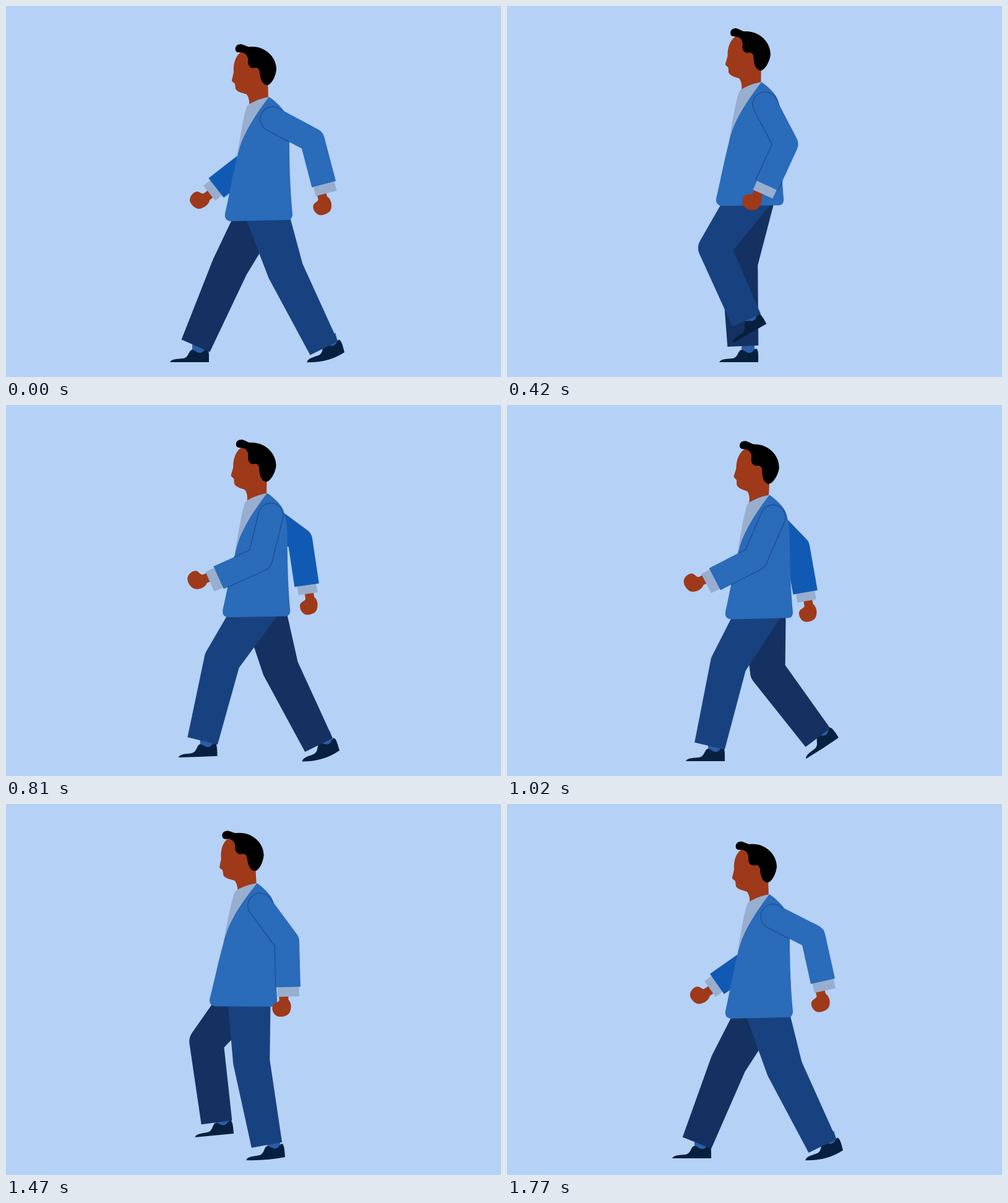
These frames come from a looping animation (800 by 600 pixels, 1.8 s). An HTML page with a canvas:

```html
<!DOCTYPE html>
<html lang="en">
<head>
<meta charset="utf-8">
<title>Walk cycle</title>
<style>
html, body { margin: 0; width: 100%; height: 100%; overflow: hidden; background: #b5d1f6; }
canvas { display: block; }
</style>
</head>
<body>
<canvas id="stage" width="800" height="600"></canvas>
<script>
const ctx = document.getElementById('stage').getContext('2d');
const LOOP = 1800, STEP = 30, RAD = Math.PI / 180;
const SKIN = '#9e391a', CLOTH = '#98aece', JACKET = '#2a6bba';

// time, x, y, lean, head tilt
const bodyKeys = [
  [0, 0, 0, 0, 0],
  [240, -7, -8, 0, 2.7],
  [460, -18, -25.5, 0.9, 2],
  [560, -22.5, -23.5, 1.5, 0.8],
  [630, -22, -19.5, 1.6, 0],
  [720, -12, -13, 0.8, 1.5],
  [890, 0, 0, 0, 3.5],
  [1020, -1, -1.5, 0, 4.5],
  [1200, -11, -11, 0, 5],
  [1370, -20, -23, 0.9, 0],
  [1470, -25, -19.5, 1.7, -3.2],
  [1620, -12, -12.5, 0.8, -1.5],
  [1770, -1, -1, 0, 0]
];
// time, knee x y, trouser end x y, heel x y, foot angle
const nearLegKeys = [
  [0, 452, 428, 514, 553.5, 547, 560, -15],
  [120, 419, 428, 494, 540, 528, 541, -30],
  [240, 381.5, 418, 456.5, 527, 491, 526, -39.4],
  [430, 335, 392, 384, 508, 416, 514, -29],
  [630, 326, 387, 330, 518, 360, 533, -14.5],
  [890, 357, 421, 316, 550, 339, 575.5, 0],
  [1020, 358, 419.5, 327.5, 551.5, 352, 576, 0],
  [1200, 362, 420, 355, 551, 381, 576, 0],
  [1470, 397, 417, 421.5, 551.5, 451, 571, -4.5],
  [1770, 449, 428, 510, 553, 543, 560, -15]
];
const farLegKeys = [
  [0, 362, 422, 306.5, 549.5, 328, 576, 0],
  [240, 356.5, 413, 336, 548, 360, 576, 0],
  [430, 377, 417, 384, 550, 409, 576, 0],
  [630, 399, 417.5, 439.5, 546.5, 472, 561, -14],
  [900, 456, 430, 521, 551, 554, 557, -18],
  [1020, 422, 431, 502.5, 538, 536, 538, -33],
  [1200, 359, 409, 433, 515, 466, 517, -33.4],
  [1330, 333, 392, 383, 506, 415, 513, -22],
  [1470, 324, 386, 340.5, 515, 368, 533, -5.5],
  [1770, 358, 420, 307, 548, 330, 573, 0]
];
// time, upper arm angle, forearm angle
const nearArmKeys = [
  [0, 62, 14.7], [240, 37, 7.5], [630, 16, -62], [880, -21, -66],
  [1020, -23.5, -62.7], [1200, 3.2, -38], [1470, 36.5, 1.5], [1770, 63, 12.5]
];
const farArmKeys = [
  [0, -18, -52], [240, -3, -32], [630, 49, -2.5], [880, 54, 10],
  [1020, 44, 10], [1200, 36, -1.6], [1470, 14, -38], [1770, -15.5, -55]
];

const jacket = new Path2D('M425 147C433 152 444 162 449 170C455 180 458 200 458 222C458 265 460 305 463 336C463 343 460 346 455 346L364 348C356 348 353 343 354 336C360 310 366 275 374 243C379 222 383 214 387 206C396 187 412 164 425 147Z');
const shirt = new Path2D('M425 147C412 149 398 155 390 161C384 175 378 215 373 246L385 246L400 190Z');
const face = new Path2D('M379 75C370 82 367 95 368 107L365 120C365 123 369 124 370 126L371 134C374 140 385 141 389 143C392 147 394 153 393 163L424 152L423 120L420 80Z');
const hair = new Path2D('M371 72C369 64 376 61 381 62C388 64 390 66 394 66C420 64 437 84 437 102C436 115 428 128 422 128C414 127 411 118 410 108C410 102 406 99 402 100C396 102 391 97 391 90C392 83 389 78 384 76C379 74 373 77 371 72Z');
// elbow at the origin, forearm pointing down
const hand = new Path2D('M0 84L0 94C3 97 4 101 4 106C3 113 1 117 -3 119C-9 122 -17 122 -21 119C-26 115 -28 107 -25 102C-22 98 -17 99 -15 95L-15 84Z');

// Monotone cubic interpolation over cyclic keys
function sample(keys, t) {
  const n = keys.length;
  const key = j => keys[(j + n) % n];
  const time = j => key(j)[0] + Math.floor(j / n) * LOOP;
  const i = keys.findLastIndex(k => k[0] <= t);
  const h = time(i + 1) - time(i), u = (t - time(i)) / h;
  return keys[0].slice(1).map((_, c) => {
    const val = j => key(j)[c + 1];
    const slope = j => (val(j + 1) - val(j)) / (time(j + 1) - time(j));
    const tangent = j => {
      const a = slope(j - 1), b = slope(j);
      return a * b > 0 ? 2 * a * b / (a + b) : 0;
    };
    const v = 1 - u;
    return v * v * (1 + 2 * u) * val(i) + u * u * (3 - 2 * u) * val(i + 1)
      + h * u * v * (v * tangent(i) - u * tangent(i + 1));
  });
}

// Limb angles run from straight down, positive towards the back
const along = (p, a, d) => [p[0] + d * Math.sin(a), p[1] + d * Math.cos(a)];
const front = (p, a, d) => [p[0] - d * Math.cos(a), p[1] + d * Math.sin(a)];
const angle = (p, q) => Math.atan2(q[0] - p[0], q[1] - p[1]);

function fill(color, path) {
  ctx.fillStyle = color;
  path ? ctx.fill(path) : ctx.fill();
}

function within(x, y, turn, draw) {
  ctx.save();
  ctx.translate(x, y);
  ctx.rotate(turn);
  draw();
  ctx.restore();
}

function shoe(x, y, a) {
  const toeY = y - 63 * Math.sin(a);
  const ground = Math.max(0, Math.min(1, (toeY - 572) / 3));
  const sag = 5 * ground * Math.min(1, -a / (12 * RAD));
  within(x, y, a, () => {
    ctx.fillStyle = '#2a5ca8';
    ctx.fillRect(-27, -34, 21, 24);
    ctx.beginPath();
    ctx.moveTo(0, 0);
    ctx.lineTo(0, -10);
    ctx.bezierCurveTo(0, -16, -1, -22, -4, -22);
    ctx.bezierCurveTo(-8, -20, -9, -15, -15, -15);
    ctx.bezierCurveTo(-20, -15, -22, -20, -28, -20);
    ctx.bezierCurveTo(-33, -18, -33, -7, -42, -6);
    ctx.bezierCurveTo(-50, -5, -60, -6, -63, 0);
    ctx.quadraticCurveTo(-30, 2 * sag, 0, 0);
    fill('#08203f');
  });
}

function leg(hip, keys, t, color) {
  const [kx, ky, cx, cy, hx, hy, a] = sample(keys, t);
  const knee = [kx, ky], cuff = [cx, cy];
  const thigh = angle(hip, knee), shin = angle(knee, cuff), mid = (thigh + shin) / 2;
  shoe(hx, hy, a * RAD);
  ctx.beginPath();
  ctx.moveTo(...front(hip, thigh, 34));
  ctx.arcTo(...front(knee, mid, 30), ...front(cuff, shin, 25), 24);
  ctx.lineTo(...front(cuff, shin, 25));
  ctx.lineTo(...front(cuff, shin, -25));
  ctx.lineTo(...front(knee, mid, -29.5));
  ctx.lineTo(...front(hip, thigh, -37));
  fill(color);
}

function arm(shoulder, keys, t, lean, color, near) {
  const [upper, fore] = sample(keys, t).map(a => a * RAD + lean);
  const elbow = along(shoulder, upper, 72.5), end = along(elbow, fore, 73.5);
  const mid = (upper + fore) / 2, miter = 20 / Math.cos((upper - fore) / 2);
  within(...elbow, -fore, () => {
    ctx.save();
    if (!near) {
      ctx.translate(9, 0);
      ctx.scale(0.95, 1);
    }
    fill(SKIN, hand);
    ctx.restore();
    const w = near ? 17.5 : 15.5;
    ctx.fillStyle = CLOTH;
    ctx.fillRect(-w, 70, 2 * w, near ? 19 : 17.5);
  });
  ctx.beginPath();
  ctx.moveTo(...front(end, fore, 20));
  ctx.lineTo(...front(elbow, mid, miter));
  ctx.arc(...shoulder, 20, Math.PI - upper, 2 * Math.PI - upper);
  ctx.arcTo(...front(elbow, mid, -miter), ...front(end, fore, -20), 20);
  ctx.lineTo(...front(end, fore, -20));
  fill(color);
  if (!near) return;
  // The seam shows only against the jacket; clipping needs its own path
  ctx.save();
  ctx.clip(jacket);
  ctx.strokeStyle = '#1d4b8c';
  ctx.lineWidth = 1.2;
  ctx.stroke();
  ctx.restore();
}

function draw(t) {
  const [x, y, leanDeg, tilt] = sample(bodyKeys, t);
  const lean = leanDeg * RAD;
  const inBody = part => within(410 + x, 347 + y, lean, () => {
    ctx.translate(-410, -347);
    part();
  });
  const hip = [415 + x - 27 * -Math.sin(lean), 320 + y];

  ctx.fillStyle = '#b5d1f6';
  ctx.fillRect(0, 0, 800, 600);
  inBody(() => arm([420, 180], farArmKeys, t, lean, '#115ab4', false));
  leg(hip, farLegKeys, t, '#153161');
  leg(hip, nearLegKeys, t, '#18427f');
  inBody(() => {
    within(410, 150, tilt * RAD, () => {
      ctx.translate(-410, -150);
      fill(SKIN, face);
      fill('#000', hair);
    });
    fill(CLOTH, shirt);
    fill(JACKET, jacket);
    arm([431, 183], nearArmKeys, t, lean, JACKET, true);
  });
}

const start = performance.now();
function tick() {
  const t = (performance.now() - start) % LOOP;
  draw(Math.floor(t / STEP) * STEP);
  requestAnimationFrame(tick);
}
tick();
</script>
</body>
</html>
```
